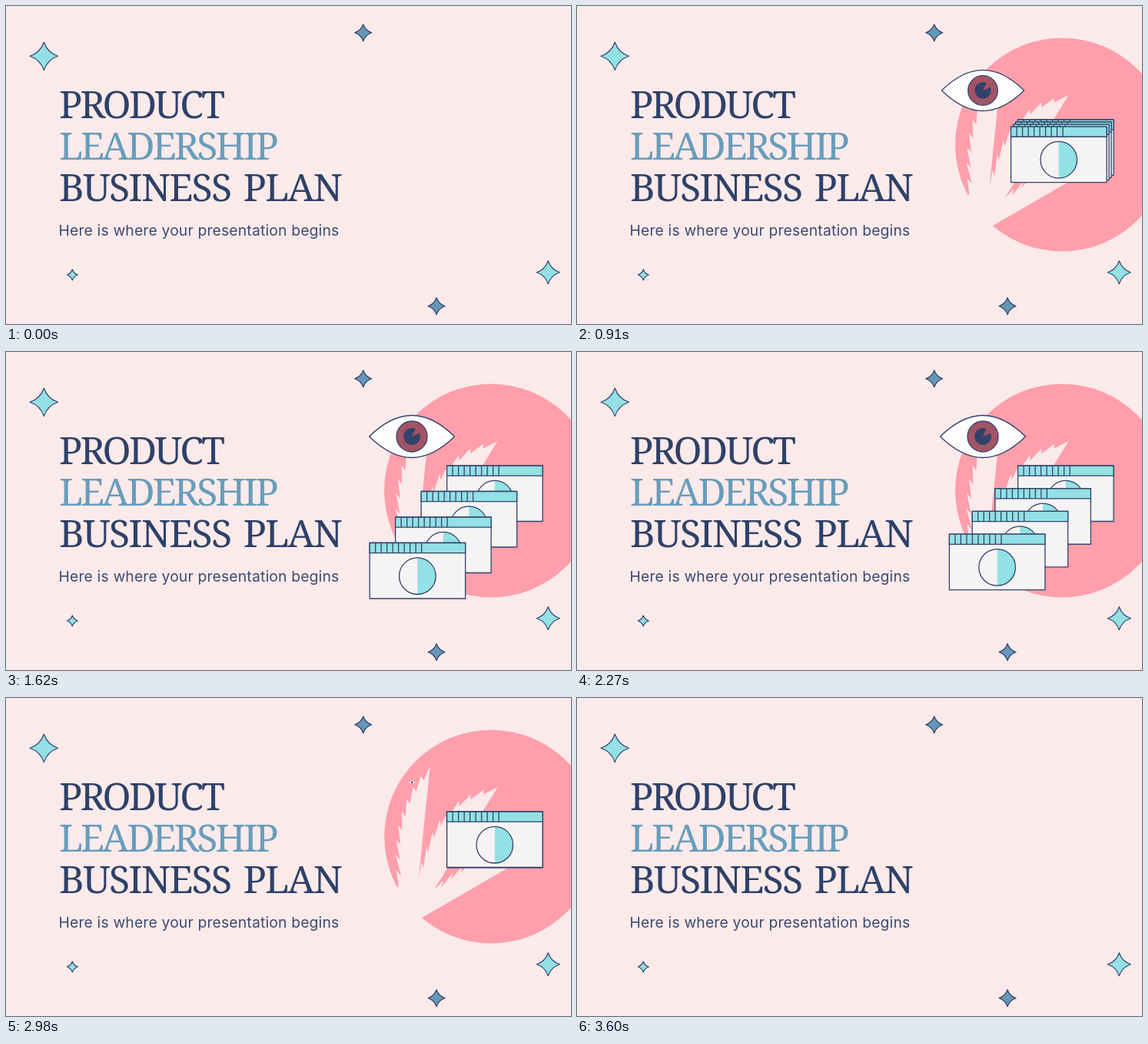
An HTML page with a canvas that plays this animation: 735x414 px, repeating every 3880 ms.

```html
<!DOCTYPE html>
<html lang="en">
<head>
<meta charset="utf-8">
<title>Business plan cover</title>
<style>
  html, body { margin: 0; width: 735px; height: 414px; overflow: hidden; background: #fbeaea; }
  canvas, svg { position: absolute; left: 0; top: 0; width: 735px; height: 414px; display: block; }
  .title { font: 400 50px "Noto Serif", "Liberation Serif", serif; letter-spacing: -2.8px; fill: #2e4168; }
  .title .accent { letter-spacing: -3.1px; fill: #689dbb; }
  .title .wide { letter-spacing: -1.8px; word-spacing: 5px; }
  .sub { font: 400 19.3px Inter, "Open Sans", sans-serif; letter-spacing: .18px; fill: #3a4a70; }
</style>
</head>
<body>
<canvas id="stage"></canvas>
<svg viewBox="0 0 735 414">
  <g class="title">
    <text x="69" y="146">PRODUCT</text>
    <text x="69" y="200" class="accent">LEADERSHIP</text>
    <text x="69" y="254" class="wide">BUSINESS PLAN</text>
  </g>
  <text class="sub" x="68.5" y="299">Here is where your presentation begins</text>
</svg>
<script>
const W = 735, H = 414, LOOP = 3880, STEP = 70;
const BG = '#fbeaea', NAVY = '#33426b', PINK = '#fe9fab', AQUA = '#93e1e4',
      BLUE = '#6598b8', PAPER = '#f5f3f4', IRIS = '#a35464';

const canvas = document.getElementById('stage');
const ctx = canvas.getContext('2d');
const dpr = window.devicePixelRatio || 1;
canvas.width = W * dpr;
canvas.height = H * dpr;

const clamp = u => Math.max(0, Math.min(1, u));
const sineInOut = u => (1 - Math.cos(Math.PI * clamp(u))) / 2;

// Constant speed with a short ramp at each end.
function ramped(u, r) {
  u = clamp(u);
  const v = 1 / (1 - r);
  if (u < r) return v * u * u / (2 * r);
  if (u > 1 - r) return 1 - v * (1 - u) ** 2 / (2 * r);
  return v * (u - r / 2);
}

// The build plays forward in fixed steps, holds, then plays backward.
function stepAt(t) {
  if (t < 150) return -1;
  if (t < 1990) return Math.min(23, Math.floor((t - 140) / STEP));
  return Math.max(-1, 22 - Math.floor((t - 1985) / STEP));
}

function paint(fill, line = 1.3) {
  if (fill) { ctx.fillStyle = fill; ctx.fill(); }
  if (line) { ctx.strokeStyle = NAVY; ctx.lineWidth = line; ctx.stroke(); }
}

function disc(x, y, r, fill, line) {
  ctx.beginPath();
  ctx.arc(x, y, r, 0, Math.PI * 2);
  paint(fill, line);
}

function star(x, y, r, fill) {
  const c = r * 0.25;
  ctx.beginPath();
  ctx.moveTo(x, y - r);
  ctx.quadraticCurveTo(x + c, y - c, x + r, y);
  ctx.quadraticCurveTo(x + c, y + c, x, y + r);
  ctx.quadraticCurveTo(x - c, y + c, x - r, y);
  ctx.quadraticCurveTo(x - c, y - c, x, y - r);
  ctx.closePath();
  paint(fill, 1.2);
}

// Barbed leaf edge along a quadratic curve, listed from leaf tip to base.
function barbs(tip, ctrl, base, count, dx, dy) {
  const at = u => [0, 1].map(k =>
    (1 - u) ** 2 * tip[k] + 2 * u * (1 - u) * ctrl[k] + u * u * base[k]);
  const pts = [];
  for (let i = 0; i < count; i++) {
    pts.push(at(i / count));
    if (i < count - 1) {
      const [x, y] = at((i + 1.2) / count);
      pts.push([x + dx, y + dy]);
    }
  }
  pts.push(base);
  return pts;
}

const leaves = [
  ...barbs([551.5, 88], [493, 146], [510.5, 246], 9, 6, 3).reverse(),
  ...barbs([639.5, 116], [552, 127], [536.5, 236], 9, 3, 5).reverse(),
  ...barbs([682.5, 204], [609.5, 191], [556.5, 250], 9, 0, 7).reverse(),
  [541, 286], [488, 300], [488, 246]
];

function backdrop(shift) {
  ctx.save();
  ctx.translate(shift, 0);
  disc(631, 180.5, 139, PINK, 0);
  ctx.beginPath();
  leaves.forEach(p => ctx.lineTo(...p));
  ctx.closePath();
  paint(BG, 0);
  ctx.restore();
}

function eye(scale) {
  if (scale <= 0) return;
  ctx.save();
  ctx.translate(528, 110);
  ctx.scale(scale, scale);
  ctx.beginPath();
  ctx.moveTo(-55.5, 0);
  ctx.bezierCurveTo(-36, -19, -18, -27.5, 0, -27.5);
  ctx.bezierCurveTo(18, -27.5, 36, -19, 55.5, 0);
  ctx.bezierCurveTo(36, 19, 18, 27.5, 0, 27.5);
  ctx.bezierCurveTo(-18, 27.5, -36, 19, -55.5, 0);
  ctx.closePath();
  paint('#fefdfd');
  disc(0, 0, 20, IRIS);
  ctx.beginPath();
  ctx.moveTo(0, 0);
  ctx.arc(0, 0, 11, -0.42, -1.12 + Math.PI * 2);
  ctx.closePath();
  paint(NAVY, 0);
  ctx.restore();
}

function card(x, y) {
  ctx.save();
  ctx.translate(x, y);
  ctx.beginPath();
  ctx.rect(0, 0, 124.5, 72.5);
  paint(PAPER);
  ctx.beginPath();
  ctx.rect(0, 0, 124.5, 13.2);
  paint(AQUA);
  ctx.beginPath();
  for (let i = 1; i <= 9; i++) {
    ctx.moveTo(i * 7.5, 0);
    ctx.lineTo(i * 7.5, 13.2);
  }
  paint(null);
  ctx.beginPath();
  ctx.arc(62.2, 43.2, 23.8, -Math.PI / 2, Math.PI / 2);
  ctx.closePath();
  paint(AQUA, 0);
  disc(62.2, 43.2, 23.8, null);
  ctx.restore();
}

function draw(t) {
  const n = stepAt(t);
  ctx.setTransform(dpr, 0, 0, dpr, 0, 0);
  ctx.lineJoin = 'round';
  ctx.fillStyle = BG;
  ctx.fillRect(0, 0, W, H);

  if (n >= 0) backdrop(243 * (1 - ramped((n + 0.33) / 8.46, 0.21)));
  if (n >= 8) {
    eye(sineInOut((n - 7.28) / 4.22));
    const gap = 33.5 * sineInOut((n - 8.69) / 11.9);
    for (let i = 0; i < 4; i++) card(573.6 - i * gap, 148 + i * gap);
  }

  star(49.3, 65.3, 18.3, AQUA);
  star(464.7, 34.8, 11, BLUE);
  star(86.3, 350, 7, AQUA);
  star(705.3, 346.7, 15, AQUA);
  star(560, 390.7, 11, BLUE);
}

const start = performance.now();
function tick() {
  draw((performance.now() - start) % LOOP);
  requestAnimationFrame(tick);
}
tick();
</script>
</body>
</html>
```
